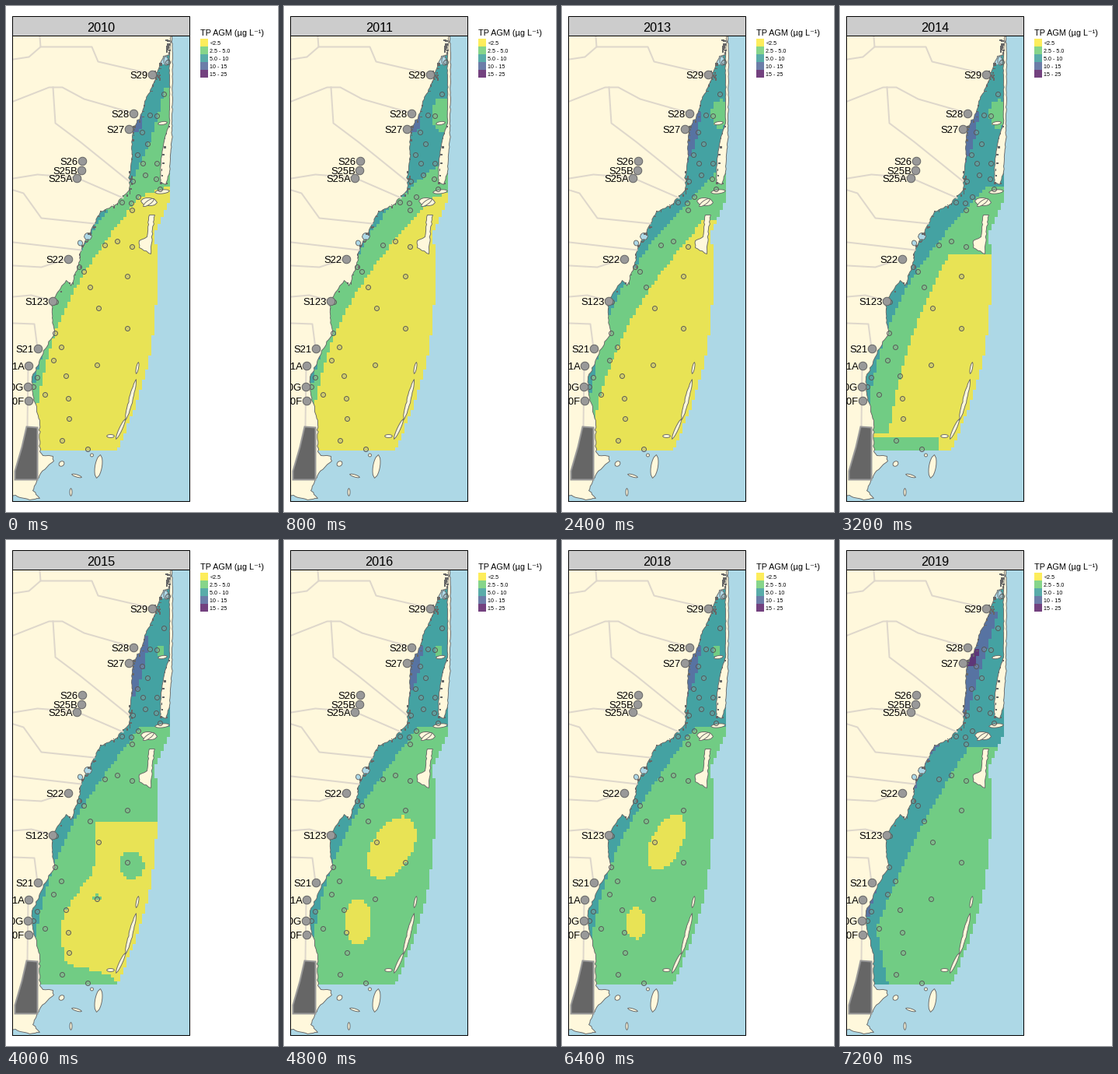
These frames come from a looping animation (350 px wide and 650 px high, 8000 ms). A matplotlib script:

```python
import numpy as np
import matplotlib.pyplot as plt
from matplotlib.animation import FuncAnimation
from matplotlib.colors import to_rgba
from matplotlib.patches import Polygon, Rectangle

W, H, DPI = 350, 650, 100
PX = 72 / DPI
WATER, LAND, COAST, CANAL = "#ADD8E6", "#FFF8DC", "#666666", "#DED7CB"
CLASSES = ["#FDE725", "#5DC863", "#21908C", "#3B528B", "#440154"]
LABELS = ["<2.5", "2.5 - 5.0", "5.0 - 10", "10 - 15", "15 - 25"]
PALETTE = np.array([to_rgba(c, 0.75) for c in CLASSES])
rng = np.random.default_rng(7)

plt.rcParams["font.family"] = ["Liberation Sans", "DejaVu Sans"]
fig = plt.figure(figsize=(W / DPI, H / DPI), dpi=DPI, facecolor="white")
ax = fig.add_axes([0, 0, 1, 1])
ax.set_axis_off()


# ---------- drawing helpers (whole numbers are pixel centres) ----------
def frame(x0, y0, x1, y1, fc, z):
    return ax.add_patch(Rectangle((x0, y0), x1 - x0, y1 - y0, fc=fc, ec="black",
                                  lw=PX, snap=False, zorder=z))


def label(x, y, s, px, ha="left"):
    return ax.text(x, y, s, size=px * PX, ha=ha, va="baseline", zorder=9)


def clip(artist):
    artist.set_clip_path(panel)
    return artist


def rough(pts, amp):
    """Break an outline into short, slightly uneven steps."""
    pts = np.array(pts, float)
    out = []
    for a, b in zip(pts, np.roll(pts, -1, axis=0)):
        n = max(1, int(np.hypot(*(b - a)) / 3))
        seg = a + (b - a) * np.arange(n)[:, None] / n
        seg[1:] += rng.normal(0, amp, (n - 1, 2))
        out.append(seg)
    return np.vstack(out)


def shape(pts, amp=0.4, fc=LAND, ec=COAST, lw=0.9, z=3):
    outline = rough(pts, amp)
    clip(ax.add_patch(Polygon(outline, fc=fc, ec=ec, lw=lw * PX, zorder=z)))
    return outline


def cay(x0, y0, x1, y1, width, fc=LAND):
    """Tapered islet between two tips."""
    t = np.linspace(0, 1, 9)
    mid = np.column_stack([x0 + (x1 - x0) * t, y0 + (y1 - y0) * t])
    side = np.array([y1 - y0, x0 - x1]) / np.hypot(x1 - x0, y1 - y0)
    off = width / 2 * np.sqrt(np.sin(np.pi * t).clip(0))[:, None] * side
    shape(np.vstack([mid + off, (mid - off)[-2:0:-1]]), 0.35, fc)


def docks(pts, spread):
    for x, y in pts:
        w, h = rng.uniform(1, 3.5, 2)
        x, y = (x, y) + rng.normal(0, spread, 2)
        clip(ax.add_patch(Rectangle((x, y), w, h, fc=COAST, lw=0, zorder=4)))


panel = frame(8, 38, 236, 636, WATER, 0)

# ---------- land ----------
MAINLAND = [(0, 30), (213, 30), (211, 62), (202, 64), (196, 80), (190, 98), (178, 122),
            (175, 136), (163, 158), (161, 196), (158, 236), (138, 257), (121, 264),
            (109, 287), (97, 311), (93, 332), (83, 359), (77, 352), (59, 377), (59, 400),
            (62, 420), (50, 440), (33, 476), (34, 497), (43, 535), (43, 572), (47, 577),
            (60, 578), (61, 584), (44, 600), (34, 622), (43, 632), (30, 634), (0, 626)]
coast = shape(MAINLAND, 0.6, z=2)
bay = coast[(coast[:, 0] > 50) & (coast[:, 1] > 72) & (coast[:, 1] < 400)]
docks(bay[rng.random(len(bay)) < 0.4], 1.0)
docks(rng.uniform((203, 40), (209, 64), (16, 2)), 0.5)
docks(rng.uniform((188, 77), (198, 93), (16, 2)), 0.5)

BARRIER = [(212, 30), (214, 60), (213, 165), (210, 212), (205, 229), (198, 226),
           (199, 196), (204, 168), (210, 150), (210, 64)]
beach = shape(BARRIER, 0.3)
docks(beach[(beach[:, 0] < 210) & (beach[:, 1] > 150)][::3], 1.0)

shape([(191, 268), (188, 286), (186, 318), (171, 310), (171, 301), (181, 296), (184, 268)])
for tips in [(173, 250, 194, 252, 10), (176, 257, 190, 247, 5), (191, 239, 210, 237, 5),
             (195, 151, 207, 149, 4), (167, 479, 153, 532, 5), (153, 530, 141, 556, 4),
             (170, 457, 167, 472, 3), (129, 552, 139, 552, 4), (121, 576, 116, 606, 9),
             (84, 601, 97, 605, 3), (68, 590, 74, 585, 6), (108, 577, 112, 576, 4),
             (83, 619, 83, 629, 3)]:
    cay(*tips)
for tips in [(100, 296, 110, 295, 9), (92, 305, 98, 303, 7), (205, 64, 206, 76, 6)]:
    cay(*tips, fc=WATER)

shape([(26, 540), (40, 541), (40, 608), (11, 608), (11, 597), (20, 566)], 0,
      "#666666", "#999999", 2, 4)

CANALS = [
    [(43, 39), (44, 52), (29, 65), (9, 68)],
    [(44, 52), (110, 52), (118, 71), (187, 87)],
    [(9, 122), (55, 104), (72, 104), (100, 119), (163, 137)],
    [(60, 104), (63, 150), (95, 174), (157, 224)],
    [(9, 221), (40, 216), (90, 220), (150, 246)],
    [(9, 236), (22, 240), (45, 272), (113, 279)],
    [(9, 303), (96, 313)],
    [(9, 333), (45, 335), (79, 324)],
    [(9, 373), (32, 371), (59, 378)],
    [(9, 407), (36, 408), (40, 439)],
    [(28, 461), (27, 540)],
]
for line in CANALS:
    clip(ax.plot(*zip(*line), color=CANAL, lw=2 * PX, zorder=2.5)[0])

# ---------- sampling points and stations ----------
SITES = [(207, 71), (202, 112), (184, 139), (193, 140), (174, 161), (181, 176), (168, 190),
         (175, 201), (193, 201), (178, 216), (192, 221), (162, 224), (197, 234), (169, 244),
         (148, 251), (160, 252), (161, 261), (142, 301), (126, 306), (161, 308), (93, 334),
         (99, 340), (155, 346), (107, 360), (63, 379), (118, 387), (155, 413), (62, 419),
         (70, 437), (60, 454), (116, 460), (39, 476), (76, 474), (34, 488), (49, 498),
         (79, 503), (80, 529), (71, 557), (104, 568)]
ax.plot(*zip(*SITES), "o", ms=6 * PX, mfc=(0.6, 0.6, 0.6, 0.3), mec="#555555",
        mew=0.9 * PX, zorder=6)

STATIONS = {"S29": (187, 87), "S28": (163, 137), "S27": (157, 157), "S26": (97, 198),
            "S25B": (96, 210), "S25A": (90, 220), "S22": (79, 324), "S123": (59, 378),
            "S21": (40, 439), "S21A": (28, 461), "S20G": (27, 488), "S20F": (28, 506)}
for name, (x, y) in STATIONS.items():
    ax.plot(x, y, "o", ms=10.5 * PX, mfc="#999999", mec="#666666", mew=PX, zorder=7)
    clip(label(x - 4.5, y + 5.5, name, 13, "right")).set_clip_on(True)

# ---------- strip and legend ----------
frame(8, 13, 236, 38, "#CCCCCC", 8)
frame(8, 38, 236, 636, "none", 8)
year = label(122, 32.5, "2010", 16.2, "center")
label(250, 37.5, "TP AGM (µg L⁻¹)", 10.9)
for i, (color, name) in enumerate(zip(PALETTE, LABELS)):
    ax.add_patch(Rectangle((249.5, 41.5 + 10 * i), 10, 10, fc=color, lw=0))
    label(262, 50 + 10 * i, name, 7.1)

# ---------- gridded surface ----------
CW, CH, COLS, ROWS = 4.0, 4.35, 45, 117
RIGHT, BOTTOM = 210.5, 570.5
X, Y = np.meshgrid(RIGHT - CW * (np.arange(COLS)[::-1] + 0.5),
                   BOTTOM - CH * (np.arange(ROWS)[::-1] + 0.5))


def west(*arcs):
    """Cells west of bowed lines, each (x0, y0, x1, y1, bow)."""
    hit = np.zeros(X.shape, bool)
    for x0, y0, x1, y1, bow in arcs:
        u = (Y - y0) / (y1 - y0)
        hit |= (u >= 0) & (u < 1) & (X < x0 + (x1 - x0) * u + bow * np.sin(np.pi * u))
    return hit


def north(*arcs):
    return west(*arcs) | (Y < arcs[0][1])


def blob(cx, cy, rx, ry, lean=0):
    return ((X - cx + lean * (Y - cy)) / rx) ** 2 + ((Y - cy) / ry) ** 2 < 1


MASK = north((211, 249, 192, 288, 0), (192, 288, 193, 318, 0), (193, 318, 143, 571, 17))
MASK &= (Y > 76) | (X > 207)
NONE = np.zeros(X.shape, bool)


def mix(a, b):
    return tuple((p + q) / 2 for p, q in zip(a, b))


# shoreline bands
LOW11, LOW13 = (190, 246, 37, 524, -31), (180, 276, 38, 545, -25)
TEAL13, TEAL15 = (211, 200, 36, 500, -40), (172, 241, 36, 510, -24)
TEAL17, TEAL18 = (186, 232, 36, 515, -32), (170, 241, 35, 520, -24)
INLET = (48, 438, 36, 485, 0)
BLUE10 = west((177, 138, 171, 162, 0))
BLUE13 = west((178, 136, 162, 200, 3))
BLUE15 = west((182, 122, 165, 200, 4), (119, 262, 103, 300, 0))

# green pockets north and open-water lows south
pocket = blob(203, 138, 11, 18)
small = blob(198, 141, 4, 7)
open17 = ~north((125, 338, 64, 554, -14)) & ~((Y > 554) & (X < 131))
open14 = ~north((140, 318, 62, 550, -12)) & ~((Y > 552) & (X < 127))
open15 = ~north((116, 362, 112, 428, 0), (112, 428, 78, 545, -22), (80, 545, 143, 571, 18))
open15 &= ~blob(161, 417, 16, 18) & ~blob(117, 459, 5, 4)

# per year: low, green pocket, teal, blue
YEARS = [
    (~north((205, 232, 170, 246, 0), (170, 246, 38, 524, -27)), NONE,
     north((203, 105, 158, 230, 6)) | west((131, 262, 95, 318, -3), INLET), BLUE10),
    (~north((212, 239, 190, 246, 0), LOW11), blob(203, 138, 13, 22),
     north((202, 200, 92, 325, -14)) | west(INLET), BLUE10),
    (~north(mix(LOW11, LOW13)), pocket, north(mix((202, 200, 36, 500, -40), TEAL13)), BLUE13),
    (~north(LOW13), pocket, north(TEAL13), BLUE13),
    (open14, pocket, north(TEAL17), BLUE13),
    (open15, small, north(TEAL15), BLUE15),
    (blob(138, 395, 28, 40, 0.35) | blob(95, 490, 17, 30), small, north(TEAL15), BLUE13),
    (open17 & ~blob(157, 413, 3, 5), blob(203, 140, 8, 9), north(TEAL17), BLUE13),
    (blob(134, 388, 21, 35, 0.35) | blob(95, 492, 13, 20), small, north(TEAL18), BLUE13),
    (NONE, NONE, north((166, 264, 46, 500, -9), (46, 500, 62, 571, 0)),
     west((203, 92, 162, 225, 0), (126, 262, 95, 322, -4), INLET)),
]


def surface(low, green, teal, blue):
    level = np.where(low, 0, 1)
    level[teal & ~green] = 2
    level[blue] = 3
    return level


levels = [surface(*spec) for spec in YEARS]
levels[-1][west((179, 139, 174, 160, 0))] = 4


def paint(level):
    rgba = PALETTE[level]
    rgba[~MASK, 3] = 0
    return rgba


image = ax.imshow(paint(levels[0]), interpolation="nearest", aspect="auto", zorder=1,
                  extent=(RIGHT - CW * COLS, RIGHT, BOTTOM, BOTTOM - CH * ROWS))
ax.set_xlim(-0.5, W - 0.5)
ax.set_ylim(H - 0.5, -0.5)


def update(i):
    image.set_data(paint(levels[i]))
    year.set_text(str(2010 + i))
    return image, year


anim = FuncAnimation(fig, update, frames=len(YEARS), interval=800, repeat=True,
                     repeat_delay=0, blit=False)
plt.show()
```
